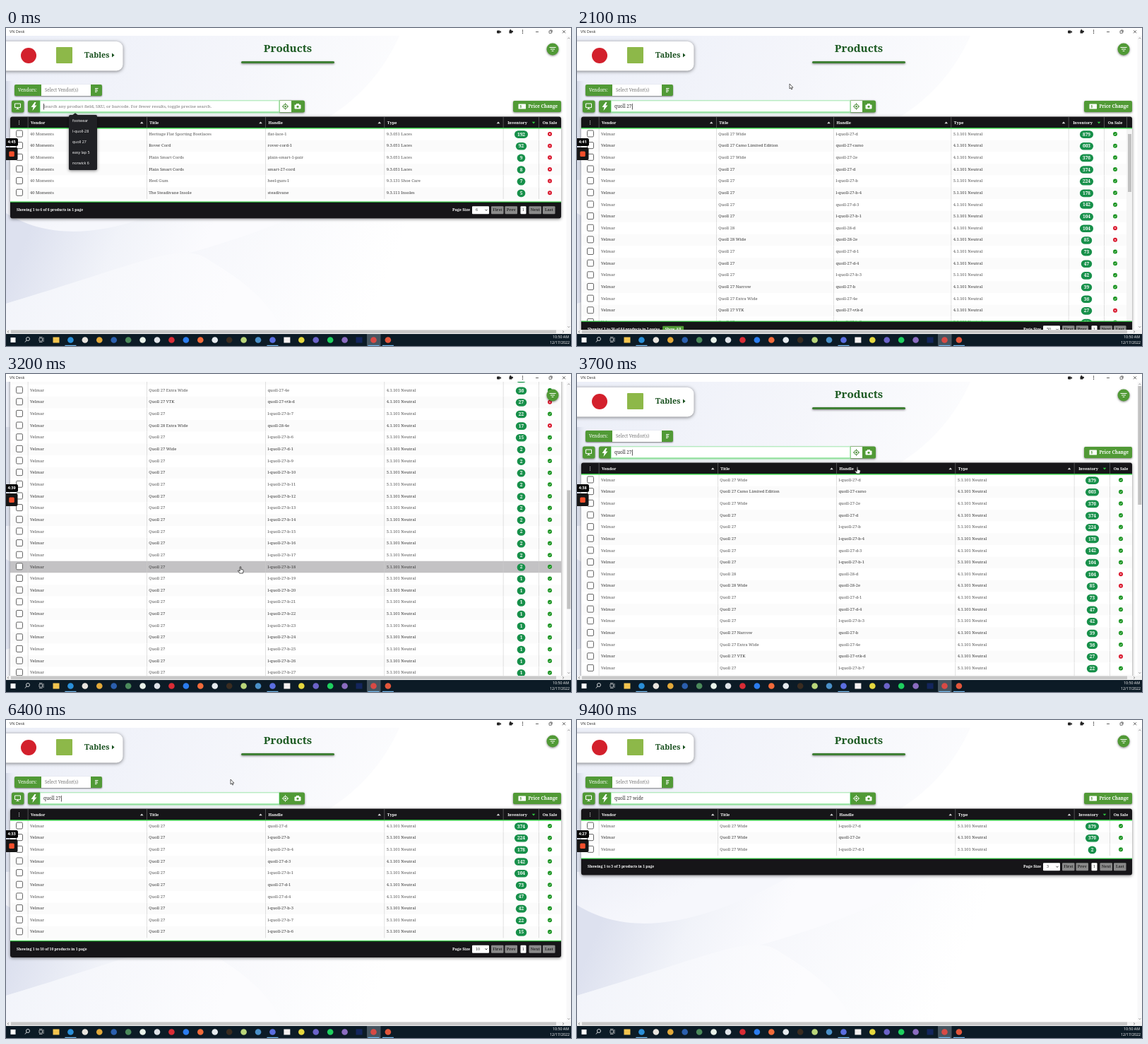
Recreate the animation shown at these times as an HTML page with a canvas. Size 800 by 450 pixels, loop 9.5 s.

```html
<!DOCTYPE html>
<html lang="en">
<head>
<meta charset="utf-8">
<title>Products</title>
<style>
html, body { margin: 0; width: 100%; height: 100%; overflow: hidden; background: #fff; }
canvas { display: block; }
</style>
</head>
<body>
<canvas id="stage" width="800" height="450"></canvas>
<script>
const LOOP = 9500;
const GREEN = '#519a36', INK = '#161518', LIME = '#2fc43f';
const SLAB = '"Roboto Slab", "Noto Serif", serif', SANS = '"Open Sans", "Noto Sans", sans-serif';
const ROW = 16.65, TOP = 142;
const ctx = document.getElementById('stage').getContext('2d');

// Product data: handle, stock, title suffix
const shoes = `l-quoll-27-d 879 Wide
quoll-27-camo 603 Camo Limited Edition
quoll-27-2e 376 Wide
quoll-27-d 374
l-quoll-27-b 224
l-quoll-27-b-4 178
quoll-27-d-3 142
l-quoll-27-b-1 104
quoll-28-d 104
quoll-28-2e 85 Wide
quoll-27-d-1 73
quoll-27-d-4 47
l-quoll-27-b-3 42
quoll-27-b 39 Narrow
quoll-27-4e 36 Extra Wide
quoll-27-vtk-d 27 VTK
l-quoll-27-b-7 22
quoll-28-4e 17 Extra Wide
l-quoll-27-b-6 15
l-quoll-27-d-1 2 Wide`.split('\n').map(entry => {
  const [handle, stock, ...rest] = entry.split(' ');
  const suffix = rest.join(' '), model = handle.includes('-28') ? 28 : 27;
  return {
    vendor: 'Velmar', title: `Quoll ${model} ${suffix}`.trim(), handle, stock, suffix, model,
    type: handle.startsWith('l-') ? '5.1.101 Neutral' : '4.1.101 Neutral',
    onSale: model === 27 && suffix !== 'VTK'
  };
});
const laces = [
  ['Heritage Flat Sporting Bootlaces', 'flat-lace-1', '9.3.051 Laces', 192],
  ['Rover Cord', 'rover-cord-1', '9.3.051 Laces', 92],
  ['Plain Smart Cords', 'plain-smart-1-pair', '9.3.051 Laces', 9],
  ['Plain Smart Cords', 'smart-27-cord', '9.3.051 Laces', 8],
  ['Heel Gum', 'heel-gum-1', '9.3.131 Shoe Care', 7],
  ['The Steadivane Insole', 'steadivane', '9.3.111 Insoles', 5]
].map(([title, handle, type, stock]) => ({ vendor: '40 Moments', title, handle, type, stock, onSale: false }));
const fuzzy = Array.from({ length: 50 }, (_, i) => shoes[i] ||
  { ...shoes[16], handle: `l-quoll-27-b-${i - 11}`, stock: i < 30 ? 2 : 1 });
const exact = shoes.filter(s => s.model === 27 && !s.suffix);
const wide = shoes.filter(s => s.model === 27 && s.suffix === 'Wide');

// Motion tracks: [time, ...values]
const pointerKeys = [[400, 150, 150], [800, 106, 162], [1000, 106, 162], [1700, 301, 79], [2200, 301, 79],
  [2500, 332, 273], [3200, 332, 273], [3700, 397, 132], [3950, 395, 111], [4250, 395, 111], [4800, 318, 84]];
const scrollKeys = [[2640, 0], [3050, 360], [3200, 360], [3600, 0]];
const toastKeys = [[4050, -45], [4350, 0], [5060, 0], [5360, -45]];
const loads = [[950, 2000], [4050, 5600], [8050, 8700]];

function track(keys, t) {
  const next = keys.findIndex(k => k[0] > t);
  if (next === 0) return keys[0].slice(1);
  if (next < 0) return keys[keys.length - 1].slice(1);
  const a = keys[next - 1], b = keys[next], u = (t - a[0]) / (b[0] - a[0]);
  const ease = u * u * (3 - 2 * u);
  return a.slice(1).map((v, i) => v + (b[i + 1] - v) * ease);
}

// Drawing helpers
function box(x, y, w, h, color, r = 0, stroke) {
  ctx.beginPath();
  ctx.roundRect(x, y, w, h, r);
  if (color) { ctx.fillStyle = color; ctx.fill(); }
  if (stroke) { ctx.strokeStyle = stroke; ctx.lineWidth = 1; ctx.stroke(); }
}
function shadowed(blur, draw, color = 'rgba(0,0,0,.5)') {
  ctx.save();
  ctx.shadowColor = color;
  ctx.shadowBlur = blur;
  ctx.shadowOffsetY = 1;
  draw();
  ctx.restore();
}
function dot(x, y, r, color) {
  ctx.beginPath();
  ctx.arc(x, y, r, 0, 7);
  ctx.fillStyle = color;
  ctx.fill();
}
function path(d, x, y, fill, stroke, width = 1) {
  ctx.save();
  ctx.translate(x, y);
  const shape = new Path2D(d);
  if (fill) { ctx.fillStyle = fill; ctx.fill(shape); }
  if (stroke) { ctx.strokeStyle = stroke; ctx.lineWidth = width; ctx.stroke(shape); }
  ctx.restore();
}
function text(s, x, y, size, color, { bold, align = 'left', font = SLAB } = {}) {
  ctx.font = `${bold ? 'bold ' : ''}${size}px ${font}`;
  ctx.textAlign = align;
  ctx.textBaseline = 'middle';
  ctx.fillStyle = color;
  ctx.fillText(s, x, y);
  return ctx.measureText(s).width;
}
function fade(x0, y0, x1, y1, ...colors) {
  const g = ctx.createLinearGradient(x0, y0, x1, y1);
  colors.forEach((c, i) => g.addColorStop(i / (colors.length - 1), c));
  return g;
}
const centered = { align: 'center', bold: true };

function drawBackdrop() {
  box(0, 0, 800, 450, '#fff');
  box(0, 11, 793, 416, fade(0, 60, 560, 300, '#eceff8', '#f5f6fb', '#fff'));
  box(0, 75, 14, 140, fade(0, 0, 14, 0, '#d3d8e6', 'rgba(236,239,248,0)'));
  path('M557 11C535 60 500 100 455 127H793V11Z', 0, 0, '#fff');
  path('M0 215V262C70 305 170 300 330 205Z', 0, 0, fade(0, 220, 40, 300, '#eef0f8', '#f6f7fc'));
  path('M0 262C70 305 170 300 330 205H520C390 300 200 330 0 390Z', 0, 0, fade(40, 270, 260, 360, '#dde1ef', '#f1f3f9', '#fbfbfe'));
  path('M0 390C200 330 250 300 290 330C340 360 375 390 390 427H0Z', 0, 0, fade(0, 340, 300, 427, '#f2f4fa', '#fcfcfe'));
}

function drawHeader(query, precise, caret) {
  shadowed(5, () => box(-10, 19, 175.5, 41.5, '#fff', 9));
  dot(32, 39, 11, '#d3202c');
  box(71, 27, 23, 23, '#8db849', 1);
  text('Tables', 111, 38.5, 10.8, '#174f1d', { bold: true });
  path('M0-3L3.5 0 0 3Z', 150, 38.5, '#174f1d');
  text('Products', 399, 30, 15.2, '#1c5a22', centered);
  shadowed(3, () => box(333, 47, 132, 3, '#3f8035', 1.5));

  shadowed(2, () => box(12, 80, 124, 16, GREEN, 2));
  text('Vendors:', 17, 88.3, 6.4, '#fff');
  box(50, 80, 70, 16, '#fff');
  text('Select Vendor(s)', 55, 88.3, 6.2, '#777');
  path('M-2-2.5H2.5M-2-.8H1.5M-2 .9H2M-2 2.6H.5', 128, 88, null, '#fff', .9);

  shadowed(3, () => {
    box(8, 102.5, 17.5, 17, GREEN, 2.5);
    box(31, 102.5, 17, 17, GREEN, [2.5, 0, 0, 2.5]);
    box(387, 102.5, 36, 17, GREEN, [0, 2.5, 2.5, 0]);
    box(718, 103, 68, 16, GREEN, 2);
  });
  path('M-4-3.5H4V2H-4ZM-2 4H2M0 2V4', 16.5, 110.5, null, '#fff');
  path('M1-6L-4 1H-1L-2 6 4-1.5H1L3-6Z', 39.5, 111, '#fff');
  shadowed(3, () => box(48, 102.5, 339, 16.5, '#8fe69b'), LIME);
  box(48.7, 103.3, 337.6, 15, '#fff');
  if (!precise) box(387.5, 103, 16.5, 16, '#fff');
  const aim = precise ? '#fff' : '#3c8228';
  path('M-3 0A3 3 0 1 1 3 0A3 3 0 1 1-3 0M0-4.7V-2.5M0 4.7V2.5M-4.7 0H-2.5M4.7 0H2.5', 395.5, 111, null, aim, .9);
  dot(395.5, 111, 1.2, aim);
  box(408.5, 108.5, 9, 6, '#fff', 1);
  box(411, 107, 4, 2, '#fff');
  dot(413, 111.3, 1.6, GREEN);
  const hint = 'Search any product field, SKU, or barcode. For fewer results, toggle precise search.';
  const typed = text(query || hint, 53, 111.3, query ? 6.4 : 6.1, query ? '#333' : '#777');
  if (caret) box(query ? 53.5 + typed : 53, 107, .7, 8.5, '#111');
  box(725.5, 107.5, 10.5, 7, '#fff', .5);
  text('$', 729, 111.2, 5, GREEN, centered);
  text('Price Change', 739.5, 111.2, 6.3, '#fff', { bold: true });
}

function drawRow(item, i, right, hovered) {
  const y = TOP + i * ROW, mid = y + 8, first = right - 82, step = (first - 31) / 4;
  const ink = i % 2 ? '#3a3a3a' : '#555';
  box(6, y, right - 6, ROW, hovered ? '#c3c2c4' : i % 2 ? '#fbfbfb' : '#fff');
  box(14.5, mid - 5, 9, 9, '#fff', 1.5, '#666');
  [item.vendor, item.title, item.handle, item.type].forEach((s, c) =>
    text(s, 34 + c * step, mid, 5.8, ink));
  for (let c = 0; c < 5; c++) box(30.8 + c * step, y, .6, ROW, '#ccc');
  box(right - 32, y, .6, ROW, '#ccc');
  const w = 8 + String(item.stock).length * 3.7;
  box(first + 25.5 - w / 2, mid - 4.7, w, 10.6, '#17904a', 5.3);
  text(item.stock, first + 25.5, mid + .7, 6.6, '#fff', centered);
  dot(right - 16, mid, 3, item.onSale ? '#18931f' : '#d9152b');
  path(item.onSale ? 'M-1.5 0L-.4 1.1 1.6-1' : 'M-1-1L1 1M1-1L-1 1', right - 16, mid, null, '#fff', .7);
}

function drawFooter(y, count) {
  const many = count === 50;
  box(6, y, 780, 23.5, INK, [0, 0, 3, 3]);
  box(6, y - .5, 780, 1.3, LIME);
  const mid = y + 11.8;
  const label = `Showing 1 to ${count} of ${many ? 64 : count} products in ${many ? '2 pages' : '1 page'}`;
  const end = 15 + text(label, 15, mid, 5.0, '#fff', { bold: true });
  if (many) {
    box(end + 4, mid - 5, 30, 10, GREEN, 1);
    text('Show All', end + 19, mid, 5.2, '#fff', centered);
  }
  text('Page Size', 632, mid, 5.4, '#fff', { bold: true });
  box(660, mid - 5.5, 24, 11, '#fff', 1);
  text(count, 665, mid, 5.4, '#333');
  path('M-1.5-1L0 .8 1.5-1', 680, mid, null, '#222', .8);
  [['First', 687], ['Prev', 706.5], ['Next', 740.5], ['Last', 760]].forEach(([s, x]) => {
    box(x, mid - 5.5, 17.5, 11, '#8a8a8a', 1);
    text(s, x + 8.8, mid, 5.5, '#2a2a2a', centered);
  });
  box(728.5, mid - 5.5, 8, 11, '#fff', 1);
  text('1', 732.5, mid, 5.3, '#333', { align: 'center' });
}

function drawTable(items, squeezed, hovered, dim) {
  const right = squeezed ? 778 : 786, first = right - 82, step = (first - 31) / 4;
  const end = squeezed ? 415 : TOP + items.length * ROW + 4;
  shadowed(4, () => box(6, 125.5, 780, end - 102, '#fff', 3));
  ctx.save();
  ctx.beginPath();
  ctx.rect(6, TOP, 780, end - TOP);
  ctx.clip();
  items.forEach((item, i) => drawRow(item, i, right, i === hovered));
  if (squeezed) {
    box(778, TOP, 8, 300, '#f4f4f4');
    box(780, 150, 5, 82, '#c1c1c1');
  }
  ctx.restore();

  box(6, 125.5, 780, 16.5, INK, [3, 3, 0, 0]);
  box(6, 141, 780, 1.4, LIME);
  text('⋮', 18.5, 134, 6.5, '#fff', centered);
  ['Vendor', 'Title', 'Handle', 'Type'].forEach((s, c) => {
    text(s, 35 + c * step, 134.2, 5.6, '#fff', { bold: true });
    path('M-2.3 1.2H2.3L0-1.4Z', 24 + (c + 1) * step, 134, '#ddd');
  });
  for (let c = 0; c < 5; c++) box(30.8 + c * step, 126, .6, 15, '#777');
  box(right - 32, 126, .6, 15, '#777');
  if (squeezed) box(778, 126, .6, 15, '#777');
  text('Inventory', first + 20, 134.2, 5.5, '#fff', centered);
  path('M-2.3-1.2H2.3L0 1.4Z', first + 43, 134, LIME);
  text('On Sale', right - 16, 134.2, 5.4, '#fff', centered);
  drawFooter(end, items.length);
  if (dim) box(6, 125.5, 780, end - 102, `rgba(0,0,0,${.4 * dim})`, 3);
}

function drawSuggestions(pointerY) {
  shadowed(4, () => box(89, 123, 40, 78, '#202125', 2));
  path('M-4 0L0-3 4 0Z', 98, 123.3, '#202125');
  ['footwear', 'l-quoll-28', 'quoll 27', 'easy lap 5', 'norwick 6'].forEach((s, i) => {
    const y = 132 + 15 * i;
    if (Math.abs(pointerY - y) < 7.5) box(89, y - 7, 40, 14, '#44464c');
    text(s, 94, y, 5.3, '#fff', { font: SANS });
  });
}

function drawToast(t) {
  const [y] = track(toastKeys, t);
  if (y <= -45) return;
  ctx.save();
  ctx.translate(0, y);
  shadowed(4, () => box(331, 19, 134, 27.5, '#fff', 1.5));
  dot(342, 32.5, 4, '#12a52a');
  path('M-2 0L-.5 1.6 2-1.4', 342, 32.5, null, '#fff', 1);
  text('Precise Search Enabled', 350, 32.5, 6.5, '#777', { font: '"Liberation Sans", Arial, sans-serif' });
  path('M-1.7-1.7L1.7 1.7M1.7-1.7L-1.7 1.7', 455, 28, null, '#999', .7);
  box(331, 44.3, 134 * Math.max(0, 1 - (t - 4100) / 950), 2, '#0cbb1c');
  ctx.restore();
}

function drawChrome(scroll, paged) {
  box(0, 0, 800, 11, '#fff');
  text('VN Desk', 5, 5.5, 5.5, '#333', { font: SANS });
  box(695, 3.5, 4.5, 4, '#222', 1);
  path('M0 0L2-1.5V1.5Z', 699, 5.5, '#222');
  box(712.5, 3.5, 4, 4, '#222', .5);
  dot(716.8, 5, 1.2, '#222');
  dot(714.3, 3.2, 1.1, '#222');
  [3.2, 5.4, 7.6].forEach(y => dot(731.5, y, .7, '#222'));
  path('M-2 0H2', 752, 5.5, null, '#222', .7);
  path('M-2-1.3H1.3V2H-2ZM-1-2.3H2.2V1', 771, 5.3, null, '#222', .6);
  path('M-2-2L2 2M2-2L-2 2', 790, 5.3, null, '#222', .7);

  box(793.5, 11, 6.5, 416, '#f8f8f9');
  path('M-1.5 .8L0-.8 1.5 .8', 796.8, 14.5, null, '#777', .7);
  path('M-1.5-.8L0 .8 1.5-.8', 796.8, 423, null, '#777', .7);
  if (paged) box(794.3, 17 + scroll * .41, 5, 168, '#c1c1c1');
  box(0, 427, 800, 6, '#f1f1f1');
  box(7, 427.5, 772, 4.5, '#c8c8c8');
  path('M.8-1.4L-.8 0 .8 1.4', 3, 429.8, null, '#555', .7);
  path('M-.8-1.4L.8 0-.8 1.4', 789, 429.8, null, '#555', .7);
}

function drawTaskbar() {
  box(0, 433, 800, 17, '#0c1b26');
  box(511, 433, 19.5, 17, '#465560');
  box(6.5, 438, 7, 7, '#fff');
  path('M2.5-1A2.5 2.5 0 1 1-2.5-1A2.5 2.5 0 1 1 2.5-1M-1.8.8L-4 3.5', 31, 441, null, '#fff', .8);
  path('M-3-2H1.5V2H-3ZM3-3V3M-3-3.5H1.5M-3 3.5H1.5', 50, 441, null, '#ddd', .7);
  ['#f3c44e', '#2a8fd8', '#e8e4de', '#e2a93a', '#2b5fae', '#4b8a5b', '#e9f3ea', '#dfe3e8', '#d92c36', '#2b7df0',
    '#f26b3a', '#e6ebef', '#3a2c20', '#b9d67a', '#4a90c8', '#5b6ee0', '#f4f0f0', '#e5d83f', '#6c63c9', '#1ed05f',
    '#8b6cc0', '#14265e', '#d84a45', '#e2563b'].forEach((color, i) => {
    const x = 71 + 20.43 * i;
    if (i === 0 || i === 16 || i === 21) box(x - 4.5, 437.5, 9, 8, color);
    else dot(x, 441.5, 4.3, color);
    if ([1, 15, 22, 23].includes(i)) box(x - 8, 448.8, 16, 1.2, '#76b9ed');
  });
  const clock = { align: 'right', font: SANS };
  text('10:50 AM', 797, 437.8, 5.3, '#fff', clock);
  text('12/17/2022', 798, 445.8, 5.3, '#fff', clock);
}

function drawRecorder(t) {
  const left = Math.floor(285.95 - t * .00195);
  box(-3, 156, 20, 11, '#080808', 2.5);
  text(`${Math.floor(left / 60)}:${String(left % 60).padStart(2, '0')}`, 8, 161.7, 5.6, '#fff',
    { align: 'center', bold: true, font: SANS });
  box(-3, 169, 19.5, 18, '#161616', 2.5);
  box(4.3, 174.5, 7.5, 7.5, '#f4502c', 1.5);
}

function drawPointer(x, y, hand, busy) {
  if (hand) path('M-.8 0Q0-1 .8 0V3.4L3.4 4Q4.4 4.4 4.2 5.6L3.4 9H-1.2L-3.6 5.4Q-3 4.4-.8 6Z', x, y, '#fff', '#222', .8);
  else path('M0 0V7L1.6 5.6 2.7 8 3.8 7.5 2.7 5.2H4.9Z', x, y, '#fff', '#222', .7);
  if (busy) {
    ctx.beginPath();
    ctx.arc(x + 6, y + 1, 2.4, 0, 7);
    ctx.strokeStyle = '#2b94dd';
    ctx.lineWidth = 1.5;
    ctx.stroke();
  }
}

function render(t) {
  const [scroll] = track(scrollKeys, t), [px, py] = track(pointerKeys, t);
  const items = t < 2000 ? laces : t < 5600 ? fuzzy : t < 8700 ? exact : wide;
  const load = loads.find(([a, b]) => t >= a && t < b);
  const squeezed = t >= 2000 && t < 2350;
  const inBody = t > 2200 && t < 3700 && py > TOP;
  const hovered = inBody ? Math.floor((py + track(scrollKeys, t - 150)[0] - TOP) / ROW) : -1;
  const typed = Math.max(0, Math.floor((t - 7100) / 170));
  const query = t < 900 ? '' : 'quoll 27' + ' wide'.slice(0, typed);

  drawBackdrop();
  ctx.save();
  ctx.beginPath();
  ctx.rect(0, 11, 793, 416);
  ctx.clip();
  ctx.translate(0, -scroll);
  drawHeader(query, t >= 4050, (t + 40) % 1060 < 580);
  drawTable(items, squeezed, hovered, load ? Math.min(1, (t - load[0]) / 150) : 0);
  ctx.translate(0, scroll);
  shadowed(3, () => dot(774, 30, 8.5, GREEN));
  path('M-4.5-2.5H4.5M-3 0H3M-1.3 2.5H1.3', 774, 30, null, '#fff', 1.2);
  drawToast(t);
  ctx.restore();

  drawChrome(scroll, items === fuzzy && !squeezed);
  drawTaskbar();
  if (t < 900) drawSuggestions(t > 400 ? py : 0);
  drawRecorder(t);
  const hand = inBody || (t > 3400 && t < 4350);
  if (t > 400 && t < 6900) drawPointer(px, py, hand, load && load[0] === 4050 && !hand);
}

function frame(now) {
  render(now % LOOP);
  requestAnimationFrame(frame);
}
requestAnimationFrame(frame);
</script>
</body>
</html>
```
